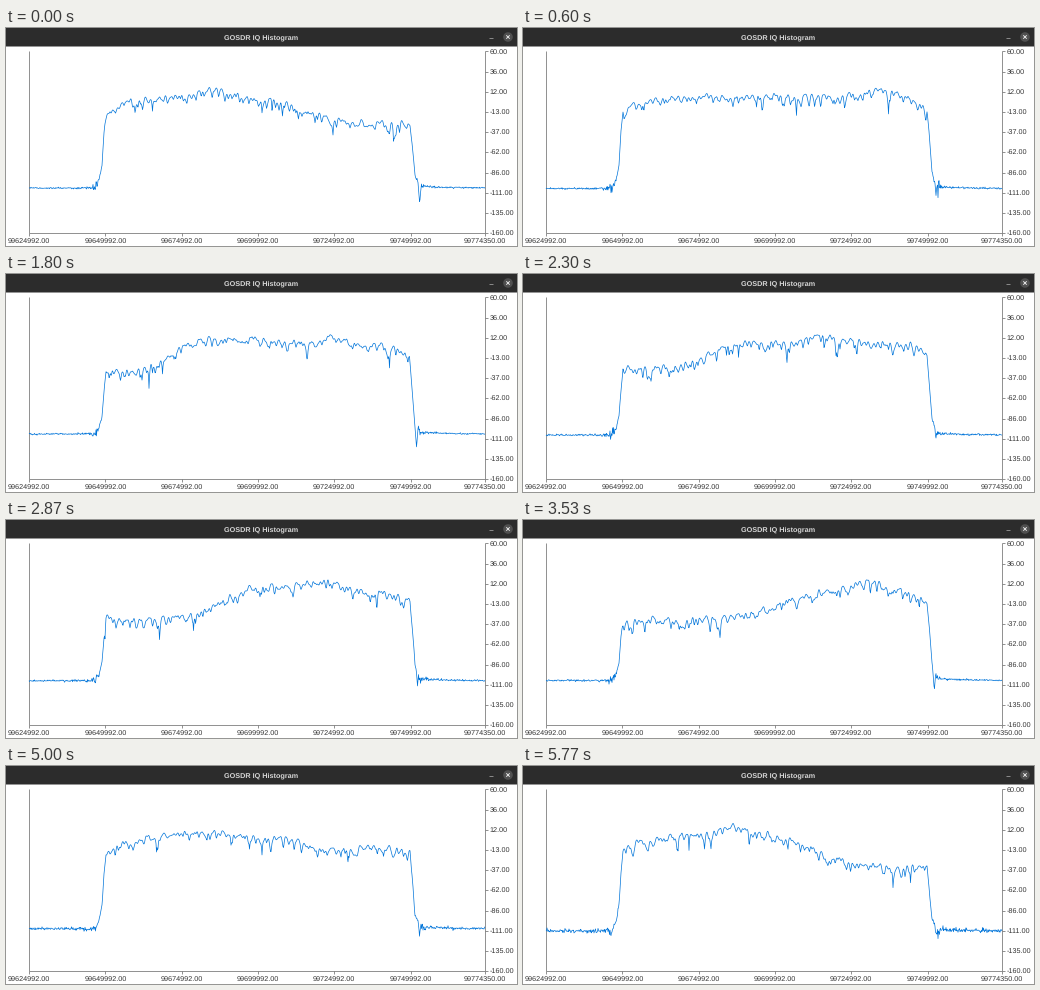
These frames come from a looping animation (511 by 218 pixels, 5810 ms). A matplotlib script:

```python
import numpy as np
import matplotlib.pyplot as plt
from matplotlib.animation import FuncAnimation
from matplotlib.patches import Circle, Rectangle

W, H, DPI = 511, 218, 100
LOOP, INTERVAL = 5810, 35
LEFT, RIGHT, TOP, BOTTOM = 23, 479, 23.5, 205
BAND = (100, 404)
BLUE, INK, AXIS = "#0074d9", "#333333", "#777777"
plt.rcParams["text.hinting"] = "none"

# Key shapes: time, shoulder drop (positive: left side, negative: right side),
# shoulder centre, shoulder width, crest position, noise floor.
SHAPES = np.array([
    (0, -28, 300, 17, 208, 160),
    (600, 0, 138, 10, 357, 160.5),
    (1270, 27, 138, 10, 357, 159),
    (2300, 25, 185, 10, 300, 161),
    (3530, 32, 255, 22, 344, 160.5),
    (4230, 0, 260, 20, 355, 160.5),
    (5770, -33, 295, 17, 208, 165),
])

xs = np.arange(LEFT, RIGHT + .25, .5)


def update_times():
    """Evenly spaced spectrum updates, aligned to the key shapes."""
    keys = SHAPES[:, 0]
    even = np.linspace(35, keys[-1], 86)
    free = [t for t in even if np.abs(keys - t).min() >= 35]
    return np.sort(np.concatenate([keys, free]))


def shape_at(time):
    return [np.interp(time, SHAPES[:, 0], column) for column in SHAPES.T[1:]]


def bump(centre, width):
    return np.exp(-((xs - centre) / width) ** 2)


def fading(rng):
    """Rounded crests with sharp dips, as in the log magnitude of a spectrum."""
    kernel = np.exp(-.5 * (np.arange(-6, 7) / 1.6) ** 2)
    kernel /= np.sqrt((kernel ** 2).sum())
    re, im = (np.convolve(rng.normal(size=xs.size), kernel, "same") for _ in range(2))
    return -16.6 * np.log10(np.hypot(1 + .48 * re, .48 * im) + .05)


def passband(drop, centre, width, crest):
    """Flat top with rounded corners, one low shoulder and a small crest."""
    side = 1 if drop >= 0 else -1
    shoulder = 1 / (1 + np.exp(side * (xs - centre) / width))
    low = abs(drop) * shoulder
    start, end = BAND
    corners = (16 * np.exp(-np.abs(xs - start) / 22)
               + 12 * np.exp(-np.abs(end - xs) / 15))
    corners *= 1 - shoulder * min(abs(drop) / 25, 1)
    return 71 + low + corners - 8 * bump(crest, 17)


def spectrum(time):
    rng = np.random.default_rng(int(time) + 7)
    *form, floor = shape_at(time)
    top = passband(*form) + fading(rng)
    if time not in SHAPES[:, 0]:
        top += 3 * np.sin(xs / rng.uniform(25, 50) + rng.uniform(0, 6.3))

    # Floor hiss swells into ringing beside both edges of the band.
    ring = 2.2 * bump(89, 3) + 2.4 * bump(414, 3)
    skirt = .6 * np.exp(-np.abs(xs - 88) / 12) + .5 * np.exp(-np.abs(xs - 415) / 12)
    hiss = .35 + .12 * max(floor - 160, 0)
    base = floor + rng.normal(size=xs.size) * (hiss + ring + skirt)
    base -= 2 * np.exp(-np.abs(xs - 415) / 25) * (xs > 415)

    rise = np.interp(xs, [88, 93, 96, 98, 100, 404, 406, 409, 413, 416],
                     [0, .1, .3, .72, 1, 1, .7, .2, .05, 0])
    y = base + (top - base) * rise
    undershoot = rng.uniform(166, 178) - 13 * np.abs(xs - rng.uniform(410, 414))
    return np.clip(np.maximum(y, undershoot), 53, BOTTOM)


fig = plt.figure(figsize=(W / DPI, H / DPI), dpi=DPI, facecolor="white")
ax = fig.add_axes([0, 0, 1, 1])
ax.set_xlim(0, W)
ax.set_ylim(H, 0)
ax.axis("off")


def px(n):
    return n * 72 / DPI


def stroke(x, y, color=AXIS, width=.8):
    return ax.plot(x, y, color=color, lw=px(width), solid_capstyle="butt")[0]


def label(x, y, text, size=7.25, **kw):
    style = dict(color=INK, ha="center", va="center", family="Liberation Sans")
    ax.text(x, y, text, fontsize=px(size), **{**style, **kw})


# Window bar
ax.add_patch(Rectangle((0, 0), W, 18.5, fc="#2c2c2c", lw=0, snap=False))
label(255.5, 9.9, "GOSDR IQ Histogram", 7.3, color="#d6d6d6", weight="bold")
stroke([483, 487], [10.5, 10.5], "#a0a0a0", .8)
ax.add_patch(Circle((502, 9), 4.8, fc="#505050", lw=0))
for s in (-1, 1):
    stroke([500.3, 503.7], [9 - 1.7 * s, 9 + 1.7 * s], "#f0f0f0", .9)

# Axes
stroke([LEFT, LEFT], [TOP, BOTTOM])
stroke([RIGHT, RIGHT], [TOP, BOTTOM])
stroke([LEFT, RIGHT], [BOTTOM + .4, BOTTOM + .4])
for i, level in enumerate([60, 36, 12, -13, -37, -62, -86, -111, -135, -160]):
    y = TOP + i * (BOTTOM - TOP) / 9
    stroke([RIGHT, RIGHT + 3], [y, y])
    label(RIGHT + 4.8, y + .2, f"{level:.2f}", ha="left")
for freq in [*range(99624992, 99750000, 25000), 99774350]:
    x = LEFT + (freq - 99624992) / 149358 * (RIGHT - LEFT)
    stroke([x, x], [BOTTOM, BOTTOM + 2.8])
    label(x, 213.3, f"{freq:.2f}")

times = update_times()
traces = [spectrum(t) for t in times]
trace = stroke(xs, traces[0], BLUE, .7)
trace.set_solid_joinstyle("round")


def draw(i):
    now = (i + 1) * INTERVAL - 1
    trace.set_ydata(traces[np.searchsorted(times, now, "right") - 1])
    return [trace]


anim = FuncAnimation(fig, draw, frames=LOOP // INTERVAL, interval=INTERVAL,
                     repeat=True, repeat_delay=0)
plt.show()
```
